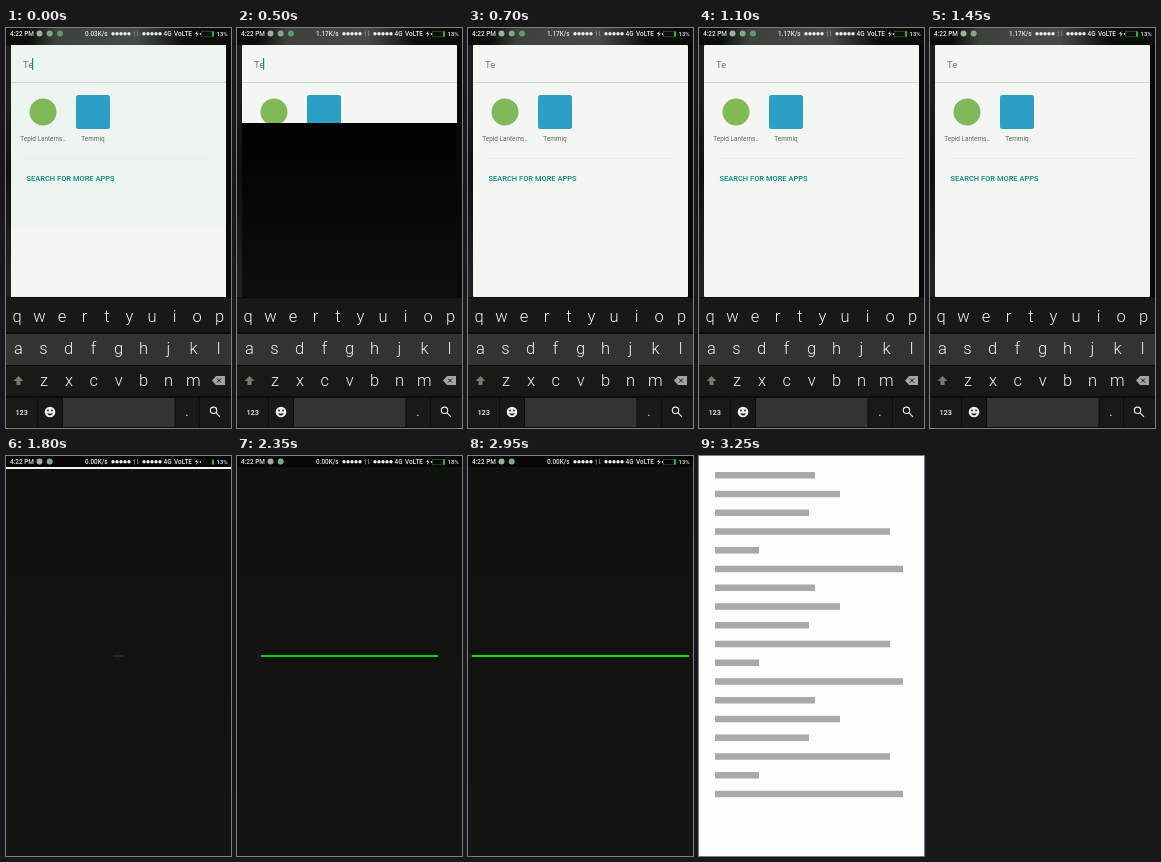
An HTML page that plays this animation: 225x400 px, repeating every 4200 ms.

```html
<!DOCTYPE html>
<html lang="en">
<head>
<meta charset="utf-8">
<title>App search and launch</title>
<style>
html, body { margin: 0; width: 100%; height: 100%; overflow: hidden; background: #000; }
svg { display: block; width: 100vw; height: 100vh; font-family: Roboto, sans-serif; }
.key { font-size: 16.5px; font-weight: 300; fill: #f2f2ee; text-anchor: middle; }
.bar { font-size: 6.4px; font-weight: 500; fill: #e4e4e4; }
.label { font-size: 6.4px; fill: #666; text-anchor: middle; }

.anim { animation: 4200ms linear infinite; }
#home { animation-name: home; }
#tint { animation-name: tint; }
#caret { animation-name: caret; }
#shade { animation-name: shade; transform-origin: 0 269px; }
#rate1 { animation-name: rate1; }
#rate2 { animation-name: rate2; }
#rate3 { animation-name: rate3; }
#note { animation-name: note; }
#case { animation-name: case; }
#strip { animation-name: strip; transform-origin: 0 11px; }
#beam { animation-name: beam; transform-origin: 112.5px 200px; }
#page { animation-name: page; }

@keyframes home { 0%, 40.47% { opacity: 1; } 41.67%, 100% { opacity: 0; } }
@keyframes tint { 0% { opacity: 1; } 11.9%, 100% { opacity: 0; } }
@keyframes caret { 0%, 13.09% { opacity: 1; } 13.1%, 100% { opacity: 0; } }
@keyframes shade {
  0%, 9.52% { transform: scaleY(0); }
  11.9%, 13.1% { transform: scaleY(1); }
  15.48%, 100% { transform: scaleY(0); }
}
@keyframes rate1 { 0%, 8.32% { opacity: 1; } 8.33%, 100% { opacity: 0; } }
@keyframes rate2 { 0%, 8.32% { opacity: 0; } 8.33%, 40.46% { opacity: 1; } 40.47%, 100% { opacity: 0; } }
@keyframes rate3 { 0%, 40.46% { opacity: 0; } 40.47%, 100% { opacity: 1; } }
@keyframes note { 0%, 27.37% { opacity: 1; } 27.38%, 100% { opacity: 0; } }
@keyframes case { 0%, 40.46% { opacity: 1; } 40.47%, 54.75% { opacity: .1; } 54.76%, 100% { opacity: 1; } }
@keyframes strip {
  0%, 40.46% { transform: scaleY(0); }
  40.47% { transform: scaleY(4); }
  42.85%, 44.04% { transform: scaleY(1); }
  45.24%, 100% { transform: scaleY(0); }
}
@keyframes beam {
  0%, 42.84% { transform: scale(0, .5); opacity: .3; }
  42.85% { transform: scale(.05, .5); opacity: .3; animation-timing-function: steps(6); }
  50%, 54.75% { transform: scale(.816, 1); opacity: .75; }
  54.76%, 61.89% { transform: scale(.816, 1); opacity: .88; }
  61.9%, 65.47% { transform: scale(.816, 1); opacity: 1; animation-timing-function: steps(4); }
  70.23%, 100% { transform: scale(1, 1); opacity: 1; }
}
@keyframes page {
  0%, 70.23% { clip-path: inset(200px 0 200px 0); animation-timing-function: steps(6); }
  77.37%, 100% { clip-path: inset(0 0 0 0); }
}
</style>
</head>
<body>
<svg viewBox="0 0 225 400" preserveAspectRatio="none">
  <defs>
    <linearGradient id="night" x2="0" y2="1">
      <stop stop-color="#0f110f"/><stop offset="1" stop-color="#141512"/>
    </linearGradient>
    <linearGradient id="dim" x2="0" y2="1">
      <stop stop-color="#000100"/><stop offset="1" stop-color="#0b100e"/>
    </linearGradient>
    <linearGradient id="sky">
      <stop offset=".1" stop-color="#0c0e0c"/><stop offset=".22" stop-color="#3c413c"/>
      <stop offset=".58" stop-color="#454a45"/><stop offset=".8" stop-color="#0c0e0c"/>
    </linearGradient>
    <linearGradient id="edge" x2="0" y2="1">
      <stop offset=".2" stop-color="#1c1e1b"/><stop offset=".5" stop-color="#0e100d"/>
      <stop offset=".9" stop-color="#20221f"/>
    </linearGradient>
  </defs>

  <rect width="225" height="400" fill="url(#night)"/>
  <rect width="225" height="11" fill="#060706"/>
  <rect id="strip" class="anim" y="11" width="225" height="2" fill="#f2f4f0"/>
  <rect id="beam" class="anim" x="4" y="199" width="217" height="2" fill="#12e612"/>

  <g id="home" class="anim">
    <rect width="225" height="270" fill="#080a08"/>
    <rect width="225" height="17" fill="url(#sky)"/>
    <rect y="17" width="5" height="253" fill="url(#edge)"/>
    <rect x="5" y="17" width="215" height="252" rx="1" fill="#f3f6f3"/>
    <g id="tint" class="anim">
      <rect x="5" y="17" width="215" height="183" fill="#eef5f1"/>
      <rect x="5" y="200" width="215" height="69" fill="#f5f5f0"/>
    </g>
    <text x="17" y="40" font-size="9.5" fill="#707570">Te</text>
    <rect id="caret" class="anim" x="26" y="30" width="1.2" height="12" fill="#0a9384"/>
    <rect x="5" y="54" width="215" height="1" fill="#d5d9d5"/>
    <circle cx="37" cy="84" r="13.5" fill="#80b957"/>
    <rect x="70" y="67" width="34" height="34" rx="2.5" fill="#2b9fc6"/>
    <text class="label" x="37" y="112.5">Tepid Lanterns..</text>
    <text class="label" x="87" y="112.5">Temmiq</text>
    <rect x="20" y="130" width="186" height=".7" fill="#e9ede9"/>
    <text x="20.5" y="153" font-size="7.5" font-weight="500" fill="#078a7c">SEARCH FOR MORE APPS</text>
    <rect id="shade" class="anim" x="5" y="95" width="215" height="174" fill="url(#dim)"/>

    <g id="keys">
      <rect y="269" width="225" height="131" fill="#0c0d0b"/>
      <rect y="270" width="225" height="34" fill="#171915"/>
      <rect y="306" width="225" height="31" fill="#31342f"/>
      <rect y="338" width="225" height="30" fill="#191a16"/>
      <path d="M0 370h31v29H0zM32 370h24v29H32zM169.500 370h23.500v29h-23.500zM194 370h31v29h-31z" fill="#191a16"/>
      <rect x="57" y="370" width="111.500" height="29" fill="#32342f"/>
      <path d="M12.500 348l5 5h-3v4h-4v-4h-3z" fill="#777973"/>
      <path d="M206 352.500l4-4.500h9v9h-9z" fill="#a3a5a0"/>
      <path d="M211 350.500l4 4m0-4l-4 4" stroke="#191a16"/>
      <text x="15.700" y="387" font-size="7.400" font-weight="500" fill="#eee" text-anchor="middle">123</text>
      <circle cx="44" cy="384" r="5.300" fill="#eee"/>
      <path d="M41 385.500q3 4 6 0z" fill="#191a16"/>
      <circle cx="42" cy="382.500" r=".9" fill="#191a16"/>
      <circle cx="46" cy="382.500" r=".9" fill="#191a16"/>
      <text class="key" x="181" y="388">.</text>
      <g fill="none" stroke="#eee" stroke-width="1.100">
        <circle cx="207.500" cy="382.300" r="3.200"/>
        <path d="M210 384.800l4 4"/>
      </g>
    </g>
  </g>

  <g id="status">
    <text class="bar" x="4" y="8.300">4:22 PM</text>
    <circle cx="33.500" cy="5.500" r="3" fill="#9caf9c"/>
    <circle cx="43.700" cy="5.500" r="3" fill="#7fa987"/>
    <circle id="note" class="anim" cx="54" cy="5.500" r="3" fill="#5d9b6c"/>
    <g class="bar">
      <text id="rate1" class="anim" x="79" y="8.300">0.03K/s</text>
      <text id="rate2" class="anim" x="79" y="8.300">1.17K/s</text>
      <text id="rate3" class="anim" x="79" y="8.300">0.00K/s</text>
      <text x="157.500" y="8.300">4G</text>
      <text x="168" y="8.300">VoLTE</text>
      <text x="210.500" y="8.300" font-size="6">13%</text>
    </g>
    <path d="M128.500 8.500v-5l-1.300 1.500M131.500 3v5l1.300-1.500" fill="none" stroke="#858585" stroke-width=".8"/>
    <path d="M191.500 3l-2.500 3h1.700l-.7 3 2.700-3.500h-1.700z" fill="#ddd"/>
    <rect id="case" class="anim" x="195.500" y="3.300" width="12" height="5.500" fill="none" stroke="#35592f" stroke-width=".7"/>
    <rect x="206" y="3.500" width="2" height="5" fill="#28b828"/>
    <rect x="193.800" y="5" width="1.200" height="2" fill="#bbb"/>
  </g>

  <g id="page" class="anim">
    <rect width="225" height="400" fill="#fdfdfb"/>
  </g>
</svg>
<script>
const add = (parent, tag, attrs, text = "") => {
  const el = document.createElementNS("http://www.w3.org/2000/svg", tag);
  for (const name in attrs) el.setAttribute(name, attrs[name]);
  el.textContent = text;
  document.getElementById(parent).append(el);
};

const row = (letters, x, step, y) =>
  [...letters].forEach((ch, i) => add("keys", "text", { class: "key", x: x + i * step, y }, ch));
row("qwertyuiop", 11, 22.5, 294);
row("asdfghjkl", 12.5, 25, 326);
row("zxcvbnm", 38, 24.9, 358);

// Two signal meters of five dots
for (const x of [107, 138])
  for (let i = 0; i < 5; i++)
    add("status", "circle", { cx: x + i * 4, cy: 5.7, r: 1.7, fill: "#eee" });

const widths = [100, 125, 94, 175, 44, 188];
for (let i = 0; i < 18; i++)
  add("page", "rect", { x: 16, y: 16 + i * 18.75, width: widths[i % 6], height: 6.5, fill: "#a9a9a8" });
</script>
</body>
</html>
```
